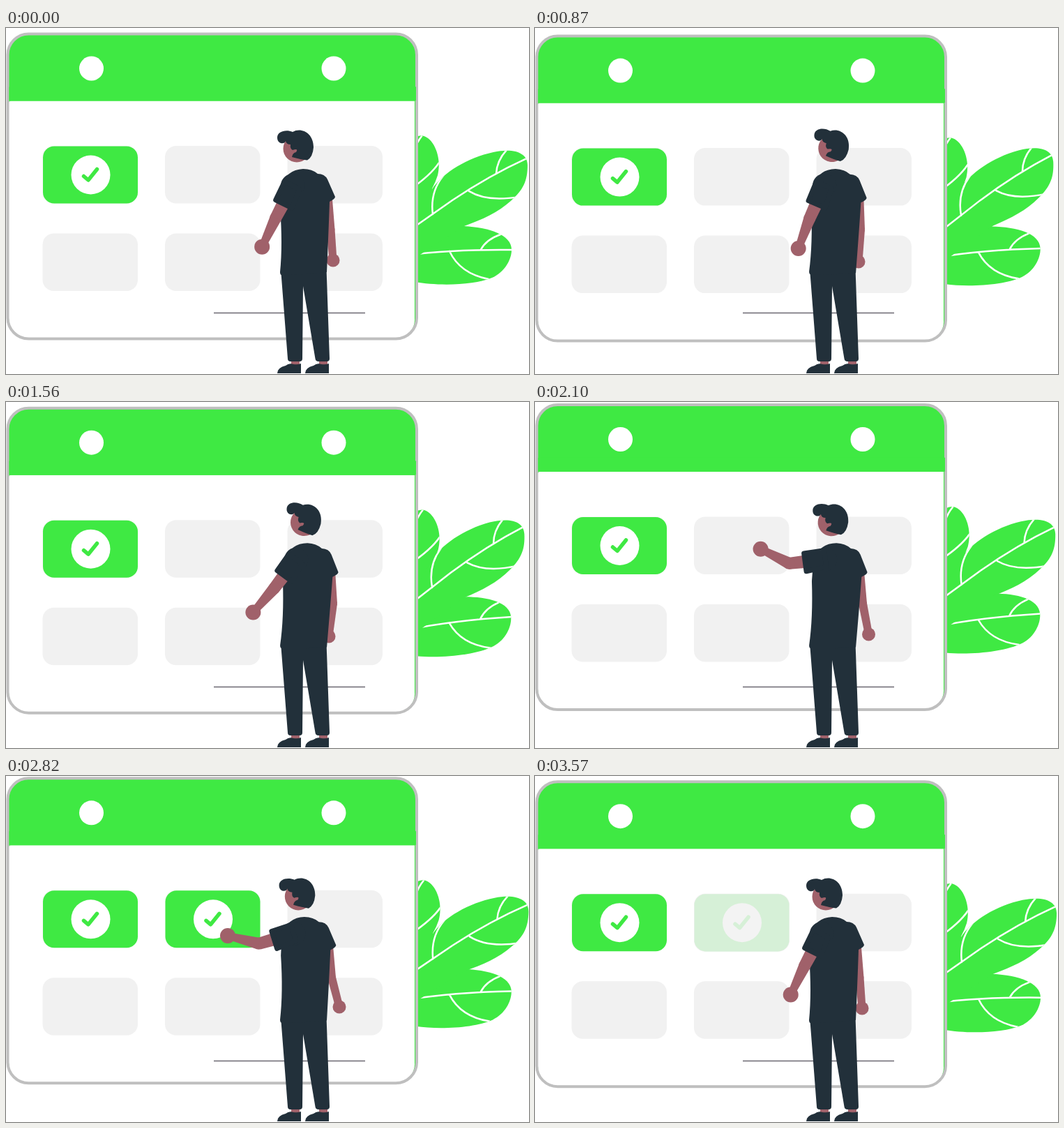
An HTML page with a canvas for the animation above (3600 ms loop, 750x496 px).

```html
<!DOCTYPE html>
<html lang="en">
<head>
<meta charset="utf-8">
<title>Calendar check</title>
<style>
html, body { margin: 0; width: 100%; height: 100%; overflow: hidden; background: #fff; }
canvas { display: block; width: 750px; height: 496px; }
</style>
</head>
<body>
<canvas id="stage" width="750" height="496"></canvas>
<script>
const ctx = document.getElementById('stage').getContext('2d');
const LOOP = 3600, STEP = 30;
const GREEN = '#3fe943', DARK = '#22303a', SKIN = '#a0616a';
const GREY = '#f1f1f1', FRAME = '#bfbfbf', WHITE = '#fff';

// Periodic monotone cubic through (times, values).
function track(times, values) {
  const n = times.length;
  const span = i => (times[(i + 1) % n] - times[i] + LOOP) % LOOP;
  const slope = i => (values[(i + 1) % n] - values[i]) / span(i);
  const tangent = times.map((_, i) => {
    const a = slope((i + n - 1) % n), b = slope(i);
    return a * b > 0 ? 2 * a * b / (a + b) : 0;
  });
  return t => {
    let i = n - 1;
    while (times[i] > t) i--;
    const j = (i + 1) % n, h = span(i), u = (t - times[i]) / h, v = 1 - u;
    return v * v * (1 + 2 * u) * values[i] + u * u * (3 - 2 * u) * values[j]
      + h * u * v * (v * tangent[i] - u * tangent[j]);
  };
}

const POSES = [0, 870, 1560, 2100, 2340, 2820, 3300, 3570];
const pose = (...values) => track(POSES, values);

const lift = track([0, 540, 870, 1110, 1560, 2100, 2500, 2820, 3300, 3570],
  [0, 2.8, 3.1, 2.5, 0.2, -4.5, -5.6, -5.2, -3.1, -0.3]);
const torsoTilt = pose(0, 1.9, 2.4, 2.4, 1.9, 0.7, 0, 0);
const headTilt = pose(0, 7.1, 7.6, 1.6, 0.9, 0.3, 0, 0);
const upperArm = pose(27.6, 24.3, 37.3, 83.5, 84.5, 73.8, 33.4, 27.8);
const foreArm = pose(25.4, 20.5, 41.3, 116.8, 118, 104.2, 39.1, 25.8);
const backElbow = pose(465.5, 467, 469, 470, 469.5, 467, 465.5, 465.5);
const backHandX = pose(469, 464, 463, 478.5, 479.5, 478, 470, 469);
const backHandY = pose(333, 335, 336, 333, 332, 331, 333, 333);

const wave = (t, peak) => Math.cos((t - peak) / LOOP * 2 * Math.PI);
const ramp = (t, a, b) => Math.min(1, Math.max(0, (t - a) / (b - a)));
const rad = deg => deg * Math.PI / 180;

const LEAVES = [
  {
    pivot: [587, 290],
    angle: t => 0.5 - 0.9 * wave(t, 600),
    body: 'M570 160 L586 157 Q596 151 605 158 C618 168 624 192 619 211 Q616 221 611 230 L606 300 H570Z',
    veins: 'M580 231 Q609 211 621 193 M586 174 Q589 164 596 155'
  },
  {
    pivot: [587, 324],
    angle: t => -2.2 + 2.2 * wave(t, 0),
    body: 'M570 280 L657 284 C692 286 725 296 725 318 C725 332 715 350 697 358 C671 369 620 370 586 364 L570 360Z',
    veins: 'M575 325.5 Q642 317 726 318 M636 320 Q651 352 692 360 M681 317.5 Q689 303 709 296'
  },
  {
    pivot: [587, 284],
    angle: t => -1.15 + 2.2 * wave(t, 3000),
    body: 'M575 290 L611 231 C627 207 662 186 699 178 C729 172 748 179 748 197 C748 219 742 232 725 247 C705 265 684 274 657 284 L586 330 H575Z',
    veins: 'M575 292.5 L640 247 Q694 211 747 187 M612 267 Q608 235 627 212 M703 209 Q704 190 718 175 M664 234 Q690 250 736 242'
  }
];
for (const leaf of LEAVES) {
  leaf.body = new Path2D(leaf.body);
  leaf.veins = new Path2D(leaf.veins);
}

const LEGS = new Path2D('M394 345 L404 474 Q404 478 408 478 H421 Q425 478 425 474 L426 370 L443.500 474 Q444 478 448 478 H460 Q464 478 464 474 L459.500 345Z');
const SHOE = new Path2D('M389 495 Q389 487 401 484 Q406 480 412 482 Q419 483 423 481 V495Z');
const TORSO = new Path2D('M426 202 Q439 202 447 209 Q457 209 461 217 L472 242 Q472 245 464 249 Q463 282 460 350 L430 353 L396 354.500 Q393 354 393 350 Q397 310 393 258 L394 228 Q402 203 426 202Z');
const HAIR = new Path2D('M411 149 C423 142 441 150 441 171 Q440 185 432 189.500 Q425 189 410 185 Q411 179 416 178 Q420 172 411 175 Q407 173 408 167 Q402 167 401 162 C400 167 389 167 389 157 C389 148 402 145 411 149Z');

function fill(path, color) {
  ctx.fillStyle = color;
  ctx.fill(path);
}

function stroke(path, color, width) {
  ctx.strokeStyle = color;
  ctx.lineWidth = width;
  ctx.stroke(path);
}

function disc(x, y, r, color) {
  ctx.fillStyle = color;
  ctx.beginPath();
  ctx.arc(x, y, r, 0, 7);
  ctx.fill();
}

function box(x, y, w, h, r, color) {
  ctx.fillStyle = color;
  ctx.beginPath();
  ctx.roundRect(x, y, w, h, r);
  ctx.fill();
}

function turn(x, y, deg) {
  ctx.translate(x, y);
  ctx.rotate(rad(deg));
  ctx.translate(-x, -y);
}

function group(draw) {
  ctx.save();
  draw();
  ctx.restore();
}

function polygon(points) {
  ctx.beginPath();
  points.forEach(p => ctx.lineTo(...p));
  ctx.closePath();
}

// Limb segment that narrows from width a to width b.
function taper([x1, y1], [x2, y2], a, b) {
  const d = Math.hypot(x2 - x1, y2 - y1) * 2;
  const nx = (y1 - y2) / d, ny = (x2 - x1) / d;
  polygon([[x1 + nx * a, y1 + ny * a], [x2 + nx * b, y2 + ny * b],
    [x2 - nx * b, y2 - ny * b], [x1 - nx * a, y1 - ny * a]]);
  ctx.fillStyle = SKIN;
  ctx.fill();
}

function limb(shoulder, elbow, hand, widths, palm) {
  taper(shoulder, elbow, widths[0], widths[1]);
  disc(...elbow, widths[1] / 2, SKIN);
  taper(elbow, hand, widths[1], widths[2]);
  disc(...hand, palm, SKIN);
}

function checkedTile(x) {
  box(x, 169.5, 136, 82, 16, GREEN);
  disc(x + 68.5, 210.5, 28, WHITE);
  stroke(new Path2D(`M${x + 58.5} 212.500 L${x + 65} 218 L${x + 77.5} 202.500`), GREEN, 5.5);
}

function drawLeaves(t) {
  for (const leaf of LEAVES) group(() => {
    turn(...leaf.pivot, leaf.angle(t));
    fill(leaf.body, GREEN);
    ctx.clip(leaf.body);
    stroke(leaf.veins, WHITE, 2.5);
  });
}

function drawCalendar(t) {
  box(3, 9, 585, 436, 29, GREEN);
  box(4, 104.5, 582, 340, [3, 0, 26, 28], WHITE);
  ctx.strokeStyle = FRAME;
  ctx.lineWidth = 4;
  ctx.beginPath();
  ctx.roundRect(2.5, 8.5, 586.5, 437, 30);
  ctx.stroke();
  box(4.5, 84, 583.5, 20.5, 1, GREEN);
  disc(122.5, 58, 17.5, WHITE);
  disc(470, 58, 17.5, WHITE);
  for (const x of [52.5, 228, 403.5])
    for (const y of [169, 294.5]) box(x, y, 136.5, 82.5, 16, GREY);
  checkedTile(53);

  const shown = ramp(t, 2250, 2450) * (1 - ramp(t, 3400, 3600));
  if (shown > 0) {
    // Blend the tile as one layer over the grey.
    checkedTile(228.5);
    ctx.globalAlpha = 1 - shown;
    box(228, 169, 137, 83, 16, GREY);
    ctx.globalAlpha = 1;
  }
}

function drawPerson(t) {
  const tilt = torsoTilt(t), c = Math.cos(rad(tilt)), s = Math.sin(rad(tilt));
  const onTorso = (x, y) => [425 + (x - 425) * c - (y - 352) * s, 352 + (x - 425) * s + (y - 352) * c];
  const reach = ([x, y], deg, len) => [x - len * Math.sin(rad(deg)), y + len * Math.cos(rad(deg))];

  limb(onTorso(462, 246), [backElbow(t), 289], [backHandX(t), backHandY(t)], [12, 12, 11], 9.5);

  for (const x of [0, 40]) group(() => {
    ctx.translate(x, 0);
    box(409, 476, 12, 8, 0, SKIN);
    fill(SHOE, DARK);
  });
  fill(LEGS, DARK);

  group(() => {
    turn(425, 352, tilt);
    fill(TORSO, DARK);
    turn(422, 195, headTilt(t));
    disc(417, 173, 19.5, SKIN);
    fill(HAIR, DARK);
  });

  const shoulder = onTorso(411, 226);
  const elbow = reach(shoulder, upperArm(t), 52);
  const hand = reach(elbow, foreArm(t), 46);
  limb(shoulder, elbow, hand, [20, 17, 10], 11);

  group(() => {
    ctx.translate(...shoulder);
    ctx.rotate(rad(upperArm(t)));
    disc(0, 0, 17, DARK);
    polygon([[-13, 0], [-12, 29.5], [14, 29], [11, 0]]);
    ctx.fillStyle = DARK;
    ctx.fill();
    ctx.strokeStyle = DARK;
    ctx.lineWidth = 7;
    ctx.stroke();
  });
}

function draw(t) {
  ctx.fillStyle = WHITE;
  ctx.fillRect(0, 0, 750, 496);
  ctx.lineCap = ctx.lineJoin = 'round';
  group(() => {
    ctx.translate(0, lift(t));
    drawLeaves(t);
    drawCalendar(t);
  });
  box(298, 407.7, 217, 1.6, 0, '#6b6872');
  drawPerson(t);
}

function tick() {
  draw(Math.floor(performance.now() % LOOP / STEP) * STEP);
  requestAnimationFrame(tick);
}
tick();
</script>
</body>
</html>
```
